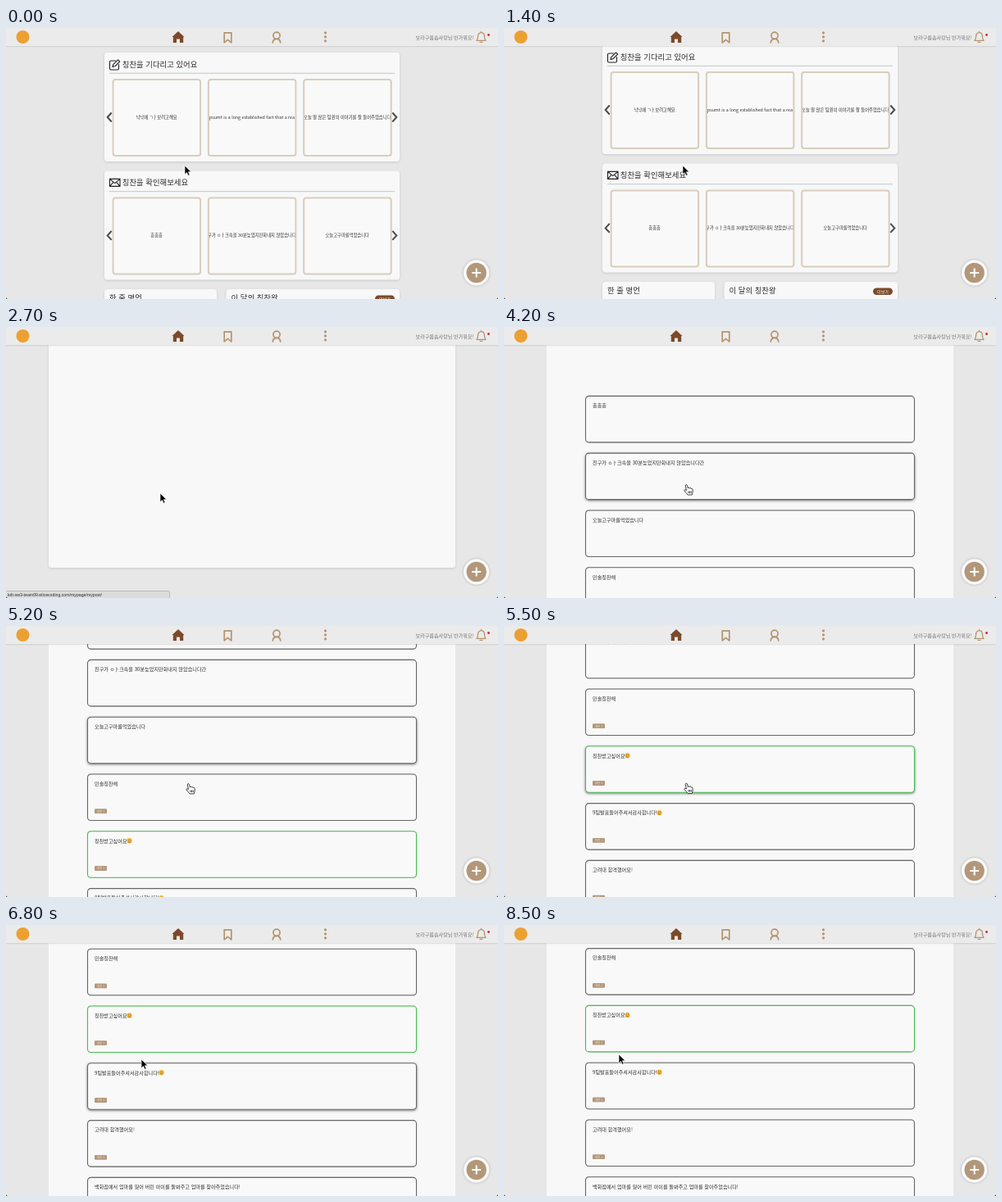
An HTML page for the animation above (8600 ms loop, 600 by 331 pixels).

```html
<!DOCTYPE html>
<html lang="ko">
<head>
<meta charset="utf-8">
<title>칭찬 게시판</title>
<style>
  html, body { margin: 0; width: 100%; height: 100%; overflow: hidden; background: #e7e7e7; }
  svg { display: block; }
  #stage { width: 600px; height: 331px; font-family: "Noto Sans CJK KR", "Noto Sans CJK", "Noto Sans", sans-serif; }
  text { fill: #2c2c2c; white-space: pre; }
  .panel { fill: #f8f8f8; filter: drop-shadow(0 1px 1.5px rgba(0,0,0,.13)); }
  .title { font-size: 9.4px; }
  .slide { fill: #faf9f9; stroke: #d8cdbd; stroke-width: 2; }
  .slide-text { font-size: 5.3px; text-anchor: middle; }
  .line { fill: none; stroke: #222; stroke-width: 1.1; stroke-linejoin: round; stroke-linecap: round; }
  .arrow { fill: none; stroke: #4a4a4a; stroke-width: 2; }
  .nav { fill: none; stroke: #b3946d; stroke-width: 1.7; stroke-linejoin: round; stroke-linecap: round; }
  .post rect.box { fill: #f9f9f9; stroke: #666; stroke-width: 1.1; filter: drop-shadow(0 .6px .7px rgba(0,0,0,.22)); }
  .post.green rect.box { stroke: #46bd50; }
  .post.hover rect.box { filter: drop-shadow(0 1px 1.6px rgba(0,0,0,.5)); }
  .post text { font-size: 6.15px; }
  .post .badge { font-size: 3.4px; fill: #f5eee5; text-anchor: middle; }
</style>
</head>
<body>
<svg id="stage" viewBox="0 0 600 331">
  <rect width="600" height="331" fill="#e7e7e7"/>
  <g id="home"></g>
  <g id="empty"><rect class="panel" x="52" y="0" width="496" height="294" rx="4"/></g>
  <g id="list">
    <rect x="52" y="0" width="496" height="340" fill="#f8f8f8"/>
    <g id="posts"></g>
  </g>

  <g id="header">
    <rect width="600" height="22" fill="#ebebeb" style="filter:drop-shadow(0 .7px .8px rgba(0,0,0,.25))"/>
    <circle cx="20.5" cy="11" r="8" fill="#eda032"/>
    <path d="M202.5 11 210 4l7.500 7h-1.300v7h-4.200v-4.500h-4v4.500h-4.200v-7z" fill="#7b4a2b"/>
    <path class="nav" d="M266.200 5.800h8.600v12l-4.300-3.400-4.300 3.400z"/>
    <circle class="nav" cx="330" cy="9.300" r="4.100"/>
    <path class="nav" d="M325.300 18c.2-3 1.800-4.700 4.700-4.700s4.500 1.700 4.700 4.700"/>
    <g fill="#b3946d">
      <circle cx="389.500" cy="5.800" r="1.600"/><circle cx="389.500" cy="10.800" r="1.600"/><circle cx="389.500" cy="15.800" r="1.600"/>
    </g>
    <text x="570.500" y="13.600" text-anchor="end" style="font-size:6.1px;fill:#777">보라구름솜사탕님 반가워요!</text>
    <path class="nav" style="stroke-width:1.300" d="M574 15.300c1.500-1.400 1.600-3 1.600-5.200 0-2.600 1.500-4.500 3.900-4.500s3.900 1.900 3.900 4.500c0 2.200.1 3.800 1.600 5.200zM578 17.300h3M579.500 4.300v1"/>
    <circle cx="588.500" cy="8.500" r="1.400" fill="#d3262c"/>
  </g>

  <g id="plus">
    <circle cx="573.700" cy="299" r="15.700" fill="#fafafa" style="filter:drop-shadow(0 .5px 1.500px rgba(0,0,0,.25))"/>
    <circle cx="573.700" cy="299" r="12.200" fill="#b3977a"/>
    <path d="M568.200 299h11M573.700 293.500v11" stroke="#fff" stroke-width="2"/>
  </g>

  <g id="status">
    <rect x="-1" y="322.500" width="200.500" height="10" rx="1.500" fill="#dcdcdc" stroke="#b0b0b0" stroke-width=".8"/>
    <text x="2" y="328.900" style="font:5.2px 'Liberation Sans',sans-serif">kdt-sw3-team09.elicecoding.com/mypage/mypost/</text>
  </g>
  <path d="M0 328.500V331h2.500Q0 331 0 328.500zM600 328.500V331h-2.500Q600 331 600 328.500z" fill="#222"/>

  <g id="cursor">
    <path id="pointer" d="M0 0v10.800l2.500-2.300 1.700 3.800 1.900-.8-1.700-3.700h3.500z" fill="#000" stroke="#fff" stroke-width=".7"/>
    <path id="hand" d="M-1.600 6.500-2.700.8C-2.800-.6-1-.9-.6.500L.4 4c.2-1.200 1.900-1.100 2 .2.400-1 1.800-.7 1.900.5.500-.7 1.700-.3 1.700.8l.2 2.800c0 1.400-.7 2-1 3.700H.1C-.8 10.300-3 8.800-4 7c-.6-1.200.9-1.700 2.400-.5zM1 7.500v2.600M2.600 7.500v2.600M4.200 7.500v2.600" fill="#fff" stroke="#111" stroke-width=".8" stroke-linejoin="round"/>
  </g>
</svg>

<script>
const $ = id => document.getElementById(id);
const LOOP = 8600, STEP = 100, PITCH = 69.8, POST_H = 56.5;

// Home page
const slide = (x, y, label) => `
  <rect class="slide" x="${x + 1}" y="${y + 1}" width="106.5" height="93" rx="3"/>
  <svg x="${x + 2}" y="${y + 2}" width="104.5" height="91">
    <text class="slide-text" x="52" y="46.800">${label}</text>
  </svg>`;

const carousel = (y, icon, title, labels) => `
  <rect class="panel" x="120" y="${y}" width="360" height="133" rx="4"/>
  <path class="line" transform="translate(126 ${y + 8})" d="${icon}"/>
  <text class="title" x="141.800" y="${y + 17.7}">${title}</text>
  <path d="M126 ${y + 25.3}h348" stroke="#b4c5c9" stroke-width=".9"/>
  ${labels.map((label, i) => slide(129.6 + i * 116.3, y + 32, label)).join('')}
  <path class="arrow" d="M128.700 ${y + 73.5}l-5 5.500 5 5.500M471.300 ${y + 73.5}l5 5.500-5 5.500"/>`;

const PENCIL = 'M7.500 2H2Q.5 2 .5 3.500v8Q.5 13 2 13h8q1.500 0 1.500-1.500V6.500M4 9.500l.7-2.800L10.500.8l2.200 2.200-5.900 5.800z';
const MAIL = 'M.5 2h12.500v9H.5zl6.250 5.200L13 2M.5 11l4.500-5.300M13 11 8.500 5.700';

$('home').innerHTML =
  carousel(30, PENCIL, '칭찬을 기다리고 있어요', [
    '낙낙에 ㄱㅏ보려고해요',
    'psumt is a long established fact that a rea',
    '오늘 말 많은 팀원의 이야기를 잘 들어주었습니다']) +
  carousel(174.4, MAIL, '칭찬을 확인해보세요', [
    '흠흠흠',
    '친구가 ㅇㅏ크속을 30분늦었지만화내지 않았습니다간',
    '오늘고구마를먹었습니다']) + `
  <rect class="panel" x="120" y="319" width="137" height="110" rx="4"/>
  <rect class="panel" x="268.500" y="319" width="211.500" height="110" rx="4"/>
  <text class="title" x="126" y="333">한 줄 명언</text>
  <text class="title" x="274.500" y="333">이 달의 칭찬왕</text>
  <rect x="450" y="326.600" width="24" height="8.400" rx="4.200" fill="#7b4a2b"/>
  <text x="462" y="332.700" text-anchor="middle" style="font-size:5px;fill:#fff">더보기</text>`;

// Post list: text, has badge, emoji x
const posts = [
  ['흠흠흠'],
  ['친구가 ㅇㅏ크속을 30분늦었지만화내지 않았습니다간'],
  ['오늘고구마를먹었습니다'],
  ['민솔칭찬해', true],
  ['칭찬받고싶어요', true, 150.5],
  ['9팀발표들어주셔서감사합니다!', true, 189.5],
  ['고려대 합격했어요!', true],
  ['백화점에서 엄마를 잃어 버린 아이를 돌봐주고 엄마를 찾아주었습니다!']
];
const ANCHOR = 3, GREEN = 4;

const face = x => `
  <circle cx="${x}" cy="11.500" r="3.200" fill="#f4b53c"/>
  <path d="M${x - 1.7} 10.800h1M${x + .7} 10.800h1M${x - 1.2} 12.800q1.200 1 2.400 0" fill="none" stroke="#7a4315" stroke-width=".7"/>`;

const badge = `
  <rect x="108" y="42.300" width="15" height="5.800" rx="1.200" fill="#b3977a"/>
  <text class="badge" x="115.500" y="46.500">칭찬 1</text>`;

$('posts').innerHTML = posts.map(([label, tagged, emoji], i) => `
  <g class="post${i === GREEN ? ' green' : ''}" transform="translate(0 ${(i - ANCHOR) * PITCH})">
    <rect class="box" x="99.500" y="0" width="401" height="${POST_H}" rx="4"/>
    <text x="108" y="13.800">${label}</text>
    ${tagged ? badge : ''}${emoji ? face(emoji) : ''}
  </g>`).join('');
const postEls = [...document.querySelectorAll('.post')];

// Motion tracks: time, then values
const cursorTrack = [
  [0, 218, 168], [1400, 218, 168], [1700, 330, 11], [1900, 330, 11],
  [2500, 188, 203], [2900, 188, 203], [3100, 224, 197], [3300, 224, 197],
  [3700, 224, 193], [5200, 224, 193], [5800, 224, 192], [6500, 186, 184],
  [6700, 170, 176], [6800, 165, 164], [7500, 148, 160], [7900, 140, 158]
];
const homeTrack = [[0, 0], [300, 40], [400, 40], [600, 62], [800, 62], [1400, 9], [1500, 0]];
const listTrack = [
  [3900, 320], [4700, 250], [4900, 250], [5100, 216], [5200, 181],
  [5400, 100], [5600, 54], [5800, 54], [6600, 29.6], [6800, 29.2], [7100, 28.6]
];

function sample(track, t) {
  const i = track.findIndex(k => k[0] > t);
  if (i === 0) return track[0].slice(1);
  if (i < 0) return track[track.length - 1].slice(1);
  const a = track[i - 1], b = track[i];
  const p = (t - a[0]) / (b[0] - a[0]);
  return a.slice(1).map((v, n) => v + (b[n + 1] - v) * p);
}

function postUnderCursor(t) {
  const [x, y] = sample(cursorTrack, t);
  const [top] = sample(listTrack, t);
  if (x < 99 || x > 501) return -1;
  return posts.findIndex((_, i) => {
    const dy = y - top - (i - ANCHOR) * PITCH;
    return dy >= 0 && dy <= POST_H;
  });
}

const show = (id, on) => { $(id).style.display = on ? '' : 'none'; };
const move = (id, x, y) => $(id).setAttribute('transform', `translate(${x} ${y})`);

function draw(t) {
  const onList = t >= 3900;
  show('home', t < 1800);
  show('empty', t >= 1800 && !onList);
  show('list', onList);
  show('status', t >= 2500 && t < 3100);
  move('home', 0, -sample(homeTrack, t)[0]);
  move('posts', 0, sample(listTrack, t)[0]);
  move('cursor', ...sample(cursorTrack, t));

  // The hover shadow trails the pointer by one step
  const hovered = onList ? postUnderCursor(t - STEP) : -1;
  postEls.forEach((el, i) => el.classList.toggle('hover', i === hovered));
  const onLink = onList && postUnderCursor(t) >= 0;
  show('hand', onLink);
  show('pointer', !onLink);
}

function tick() {
  draw(Math.floor(performance.now() % LOOP / STEP) * STEP);
  requestAnimationFrame(tick);
}
tick();
</script>
</body>
</html>
```
